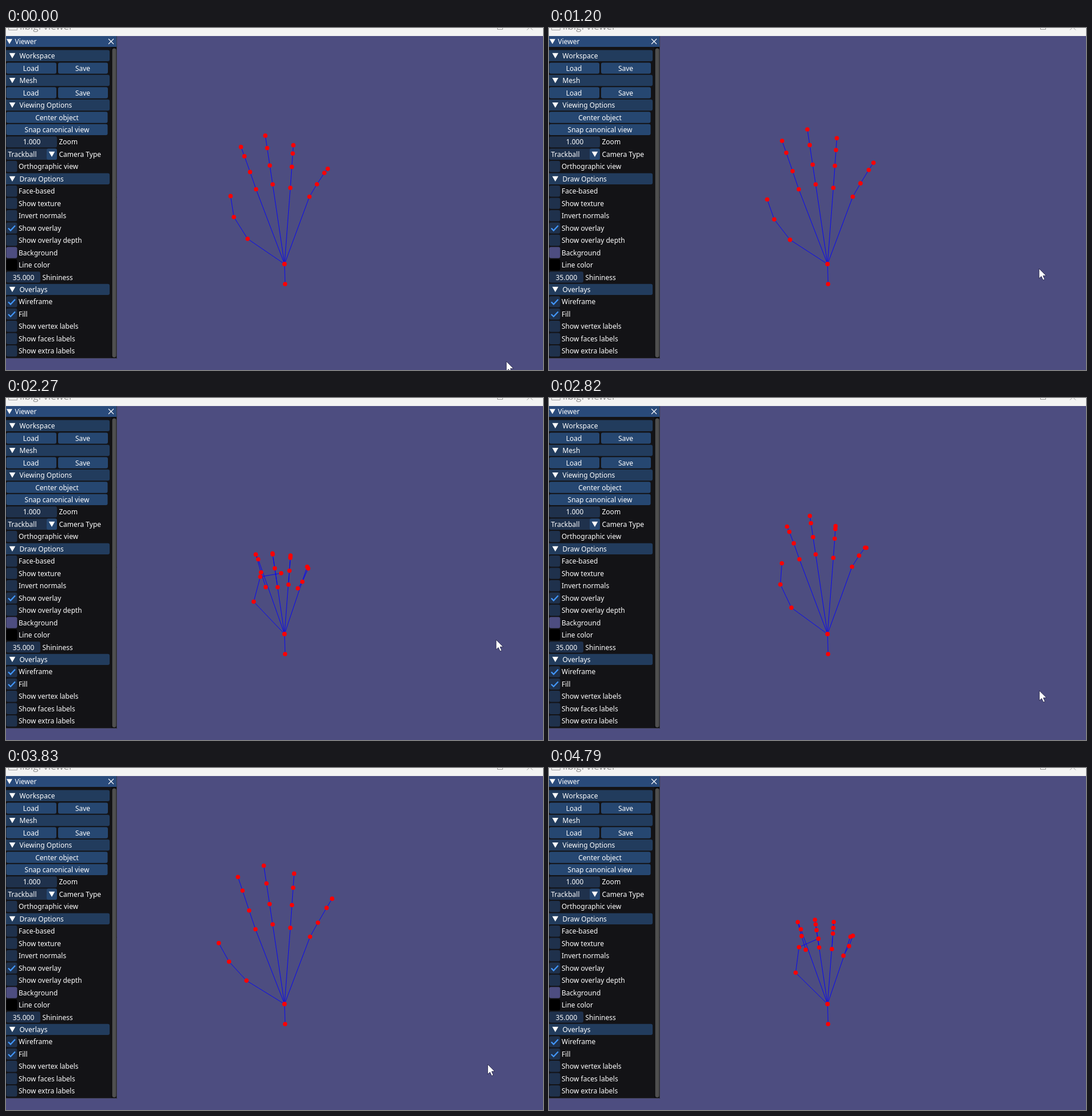
Animation of 938 by 597 pixels, one loop 5050 ms. Source, as an HTML page with a canvas:

```html
<!DOCTYPE html>
<html lang="en">
<head>
<meta charset="utf-8">
<title>Hand viewer</title>
<style>
html, body { margin: 0; width: 100%; height: 100%; overflow: hidden; background: #4d4d80; }
canvas { display: block; }
</style>
</head>
<body>
<canvas id="stage" width="938" height="597"></canvas>
<script>
const ctx = document.getElementById('stage').getContext('2d');
const LOOP = 5050, STEP = 67.46, LAST_STEP = 71;
const COLOR = {
  back: '#4d4d80', panel: '#131316', title: '#294a7a', header: '#223c5d',
  button: '#264771', field: '#1f314c', mark: '#4296fa', text: '#ffffff'
};

const stepAt = t => Math.min(LAST_STEP, Math.floor(t / STEP + 0.2));

// The hand closes steadily, then snaps open and starts over.
const CYCLE = 19.9, OPEN = 5.2;
const curlAt = step => (step + OPEN) % CYCLE - OPEN;

// Every bone has a length, a bend in degrees at curl 0 and a bend rate.
// Fingers fold along their direction; lean 1 lets the thumb turn in the picture plane.
const WRIST = [486.5, 412], FOREARM = [487.5, 447];
const FINGERS = [
  { base: WRIST, drift: 0, aim: 0, lean: 1,
    bones: [78, 45, 37], bend: [-55.7, -32.2, -9], rate: [0.77, 3, 5.7] },
  { base: [436.8, 281.5], drift: 0.28, aim: -17.8, lean: -0.04,
    bones: [36.8, 37.8, 27], bend: [30, 39.5, 50], rate: [2.9, 7, 8.1] },
  { base: [465.8, 273], drift: 0, aim: -8.6, lean: 0,
    bones: [36.2, 37.4, 33.4], bend: [23, 34.5, 49], rate: [4.1, 6.4, 8.1] },
  { base: [496.7, 279], drift: 0, aim: 4, lean: 0,
    bones: [41, 33, 27], bend: [26.5, 45, 57.5], rate: [3.7, 6.3, 9.5] },
  { base: [530, 294.5], drift: -0.3, aim: 28, lean: 0.1,
    bones: [28.7, 32.5, 21], bend: [27.7, 44, 64], rate: [4.2, 6.2, 10.5] }
];
const rad = deg => deg * Math.PI / 180;

function fingerPoints({ base, drift, aim, lean, bones, bend, rate }, curl) {
  const eased = curl + 0.015 * curl * curl;
  const dx = Math.sin(rad(aim)), dy = -Math.cos(rad(aim));
  let [x, y] = base;
  x += drift * curl;
  const points = [[x, y]];
  bones.forEach((length, i) => {
    const angle = rad(bend[i] + rate[i] * eased);
    const along = length * Math.cos(angle), across = length * lean * Math.sin(angle);
    x += along * dx - across * dy;
    y += along * dy + across * dx;
    points.push([x, y]);
  });
  return points;
}

function drawHand(curl) {
  const chains = [[FOREARM], ...FINGERS.map(f => fingerPoints(f, curl))];
  for (const chain of chains) stroke([WRIST, ...chain], '#0000ff', 0.9);
  ctx.fillStyle = '#ff0000';
  for (const [x, y] of [WRIST, ...chains.flat()]) {
    ctx.beginPath();
    ctx.arc(x, y, 3.8, 0, Math.PI * 2);
    ctx.fill();
  }
}

// Stops of the wandering pointer: step, x, y.
const POINTER = [
  [0, 874, 582], [8, 850, 398], [16, 869, 490], [18, 856, 420], [24, 870, 476],
  [34, 854.5, 416], [41, 858, 507], [51, 843, 546], [62, 839.5, 483],
  [64, 890, 555], [67, 878, 600]
];

function pointerAt(step) {
  const i = POINTER.findIndex(stop => stop[0] > step);
  if (i < 0) return POINTER.at(-1).slice(1);
  const [s0, x0, y0] = POINTER[i - 1], [s1, x1, y1] = POINTER[i];
  const f = (step - s0) / (s1 - s0);
  return [x0 + (x1 - x0) * f, y0 + (y1 - y0) * f];
}

function drawPointer([x, y]) {
  const arrow = [[0, 0], [0, 17.2], [4, 13.6], [7, 20], [9.8, 18.8], [7, 12.5], [12.3, 12.2]]
    .map(([dx, dy]) => [x + dx, y + dy]);
  polygon(arrow, '#ffffff');
  stroke([...arrow, arrow[0]], '#1c1c40', 0.8);
}

function polygon(points, color) {
  ctx.beginPath();
  points.forEach(([x, y]) => ctx.lineTo(x, y));
  ctx.closePath();
  ctx.fillStyle = color;
  ctx.fill();
}

function stroke(points, color, width) {
  ctx.beginPath();
  points.forEach(([x, y]) => ctx.lineTo(x, y));
  ctx.strokeStyle = color;
  ctx.lineWidth = width;
  ctx.stroke();
}

function box(x, y, w, h, color, radius = 3) {
  ctx.beginPath();
  ctx.roundRect(x, y, w, h, radius);
  ctx.fillStyle = color;
  ctx.fill();
}

function label(text, x, y, align = 'left') {
  ctx.font = '12px "Noto Sans", "Open Sans", sans-serif';
  ctx.textAlign = align;
  ctx.fillStyle = COLOR.text;
  ctx.fillText(text, x, y + 4.7);
}

function triangle(x, y, r) {
  polygon([[x - r, y - r * 0.85], [x + r, y - r * 0.85], [x, y + r * 0.9]], COLOR.text);
}

const rowY = i => i ? 70 + 21.46 * (i - 1) : 48.2;
const bar = (x, y, w, color) => box(x, y - 9.6, w, 19.4, color);

const ROW = {
  header(y, text) {
    bar(-4, y, 185, COLOR.header);
    triangle(11, y, 5.3);
    label(text, 23.5, y);
  },
  pair(y) {
    bar(0.5, y, 87.5, COLOR.button);
    bar(91, y, 87, COLOR.button);
    label('Load', 43.5, y, 'center');
    label('Save', 134, y, 'center');
  },
  button(y, text) {
    bar(0.5, y, 177, COLOR.button);
    label(text, 89, y, 'center');
  },
  field(y, text, value, width) {
    bar(0.5, y, width - 0.5, COLOR.field);
    label(value, width / 2 + 0.5, y, 'center');
    label(text, width + 3.5, y);
  },
  combo(y, text, value) {
    bar(0.5, y, 88.5, COLOR.field);
    bar(71, y, 18, COLOR.button);
    label(value, 3.5, y);
    triangle(80, y, 5.3);
    label(text, 92.5, y);
  },
  check(y, text, on) {
    bar(0.5, y, 19, COLOR.field);
    if (on) stroke([[4, y + 0.5], [8, y + 4.5], [16, y - 4]], COLOR.mark, 2.3);
    label(text, 22, y);
  },
  swatch(y, text, color) {
    bar(0.5, y, 19, color);
    label(text, 22, y);
  }
};

const ROWS = [
  ['header', 'Workspace'], ['pair'], ['header', 'Mesh'], ['pair'],
  ['header', 'Viewing Options'], ['button', 'Center object'], ['button', 'Snap canonical view'],
  ['field', 'Zoom', '1.000', 89], ['combo', 'Camera Type', 'Trackball'],
  ['check', 'Orthographic view'], ['header', 'Draw Options'], ['check', 'Face-based'],
  ['check', 'Show texture'], ['check', 'Invert normals'], ['check', 'Show overlay', true],
  ['check', 'Show overlay depth'], ['swatch', 'Background', COLOR.back],
  ['swatch', 'Line color', '#000000'], ['field', 'Shininess', '35.000', 60],
  ['header', 'Overlays'], ['check', 'Wireframe', true], ['check', 'Fill', true],
  ['check', 'Show vertex labels'], ['check', 'Show faces labels'], ['check', 'Show extra labels']
];

function drawWindowBar() {
  box(0, 0, 938, 14, '#f3f3f3', 0);
  ctx.font = '17px "Open Sans", "Noto Sans", sans-serif';
  ctx.textAlign = 'left';
  ctx.fillStyle = '#929292';
  ctx.fillText('libigl viewer', 24, 3);
  const grey = '#9a9a9a';
  stroke([[4.5, -1], [4.5, 3.5], [19.5, 3.5], [19.5, -1]], grey, 1);
  stroke([[858.5, -1], [858.5, 2.5], [867.5, 2.5], [867.5, -1]], grey, 1);
  stroke([[910, 3.5], [915, -1.5], [920, 3.5]], grey, 1);
}

function drawPanel() {
  box(0, 14, 194, 563, COLOR.panel, 0);
  box(0, 14, 194, 19, COLOR.title, 0);
  triangle(6, 23.5, 5);
  label('Viewer', 15.5, 23.5);
  stroke([[179, 19], [188, 28]], COLOR.text, 1.1);
  stroke([[188, 19], [179, 28]], COLOR.text, 1.1);
  box(184, 33, 10, 544, '#0c0c0e', 0);
  box(185.5, 35.5, 7, 539.5, '#4f4f4f', 3.5);
  stroke([[193.5, 14], [193.5, 576.5], [0, 576.5]], '#3c3c4a', 1);
  ROWS.forEach(([kind, ...args], i) => ROW[kind](rowY(i), ...args));
}

const start = performance.now();

function draw() {
  const step = stepAt((performance.now() - start) % LOOP);
  box(0, 0, 938, 597, COLOR.back, 0);
  drawWindowBar();
  drawPanel();
  drawHand(curlAt(step));
  drawPointer(pointerAt(step));
  requestAnimationFrame(draw);
}
draw();
</script>
</body>
</html>
```
